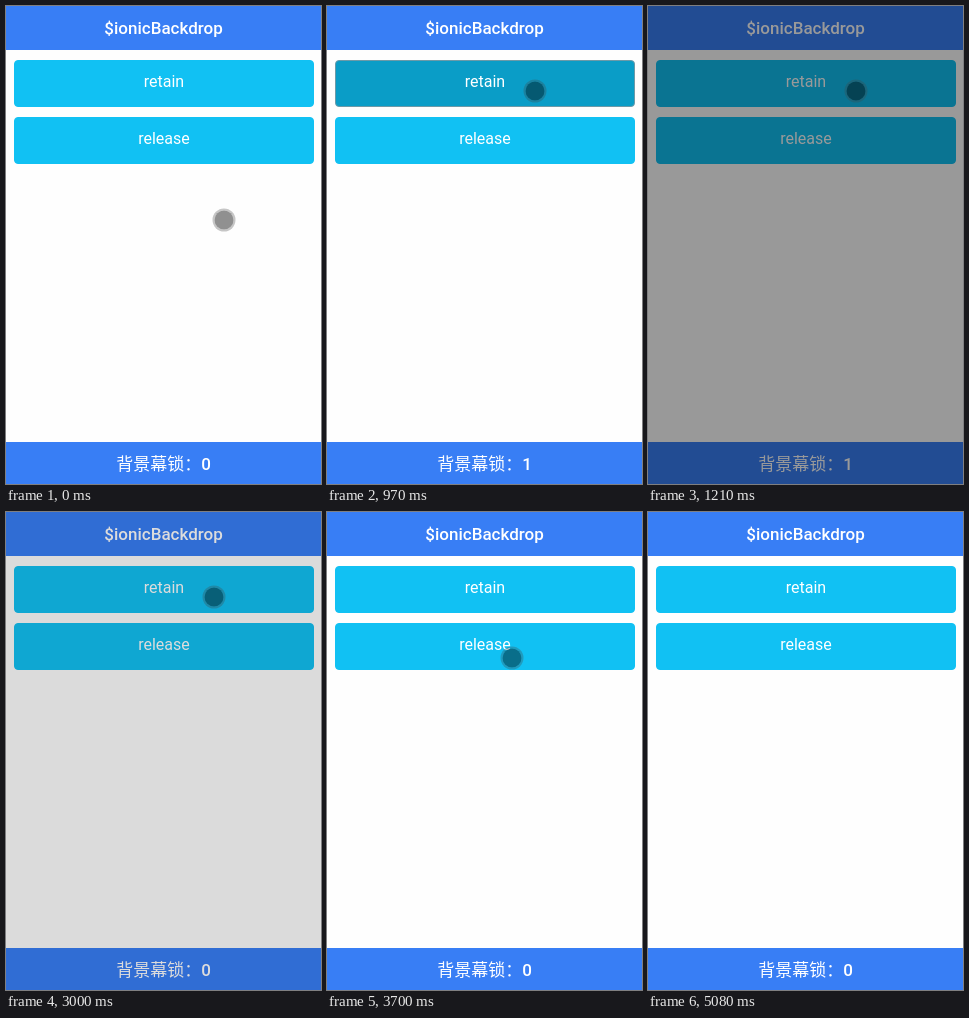
An HTML page that plays this animation: 315x478 px, repeating every 5770 ms.

```html
<!DOCTYPE html>
<html lang="zh-CN">
<head>
<meta charset="utf-8">
<title>$ionicBackdrop</title>
<style>
  html, body { margin: 0; width: 100%; height: 100%; overflow: hidden; background: #fefefe; }
  body { position: relative; font-family: Roboto, "Noto Sans CJK SC", "Noto Sans CJK", sans-serif; color: #fff; }
  .bar, .button, #backdrop, #touch { position: absolute; box-sizing: border-box; }
  .bar { left: 0; width: 315px; background: #387ef5; text-align: center; font-size: 17px; font-weight: 500; white-space: nowrap; }
  #header { top: 0; height: 44px; line-height: 44px; }
  #footer { top: 436px; height: 42px; line-height: 44px; }
  #footer span { font-weight: 300; }
  .button { left: 8px; width: 300px; height: 47px; border: 1px solid #11c1f3; border-radius: 4px;
    background: #11c1f3; text-align: center; font-size: 16px; line-height: 42px; }
  .button.active { background: #0a9dc7; border-color: #6c9aa8; }
  #retain { top: 54px; }
  #release { top: 111px; }
  #backdrop { left: 0; top: 0; width: 315px; height: 478px; background: #000; }
  #touch { left: -11.5px; top: -11.5px; width: 23px; height: 23px; border: 2px solid rgba(70, 70, 70, .3);
    border-radius: 50%; background: rgba(0, 0, 0, .43); background-clip: padding-box; }
</style>
</head>
<body>
<div class="bar" id="header">$ionicBackdrop</div>
<div class="button" id="retain">retain</div>
<div class="button" id="release">release</div>
<div class="bar" id="footer"><span>背景幕锁：</span><b id="count" style="font-weight:500">0</b></div>
<div id="backdrop"></div>
<div id="touch"></div>
<script>
  const LOOP = 5770;
  const $ = id => document.getElementById(id);
  const [retain, release, count, backdrop, touch] =
    ['retain', 'release', 'count', 'backdrop', 'touch'].map($);

  // [start time, x, y]
  const path = [
    [0, 217.5, 213.5], [120, 213.5, 179.5], [270, 210.5, 126.5], [390, 208.5, 87.5], [540, 207.5, 84.5],
    [3430, 204.5, 100.5], [3580, 195.5, 124.5], [3700, 184.5, 145.5],
    [4690, 188.5, 152.5], [4840, 209.5, 232.5], [4960, 233.5, 333.5]
  ];
  // [start time, opacity]
  const fade = [[0, 0], [1090, .2], [1210, .4], [3000, .137], [3120, 0]];

  const at = (steps, t) => steps.findLast(s => s[0] <= t);
  const within = (t, from, to) => t >= from && t < to;

  function render(t) {
    const [, x, y] = at(path, t);
    touch.style.transform = `translate(${x}px, ${y}px)`;
    touch.style.visibility = t < 5080 ? 'visible' : 'hidden';
    backdrop.style.opacity = at(fade, t)[1];
    retain.classList.toggle('active', within(t, 970, 1090));
    release.classList.toggle('active', within(t, 3980, 4290));
    count.textContent = within(t, 970, 3000) ? '1' : '0';
  }

  const start = performance.now();
  function tick() {
    render((performance.now() - start) % LOOP);
    requestAnimationFrame(tick);
  }
  tick();
</script>
</body>
</html>
```
